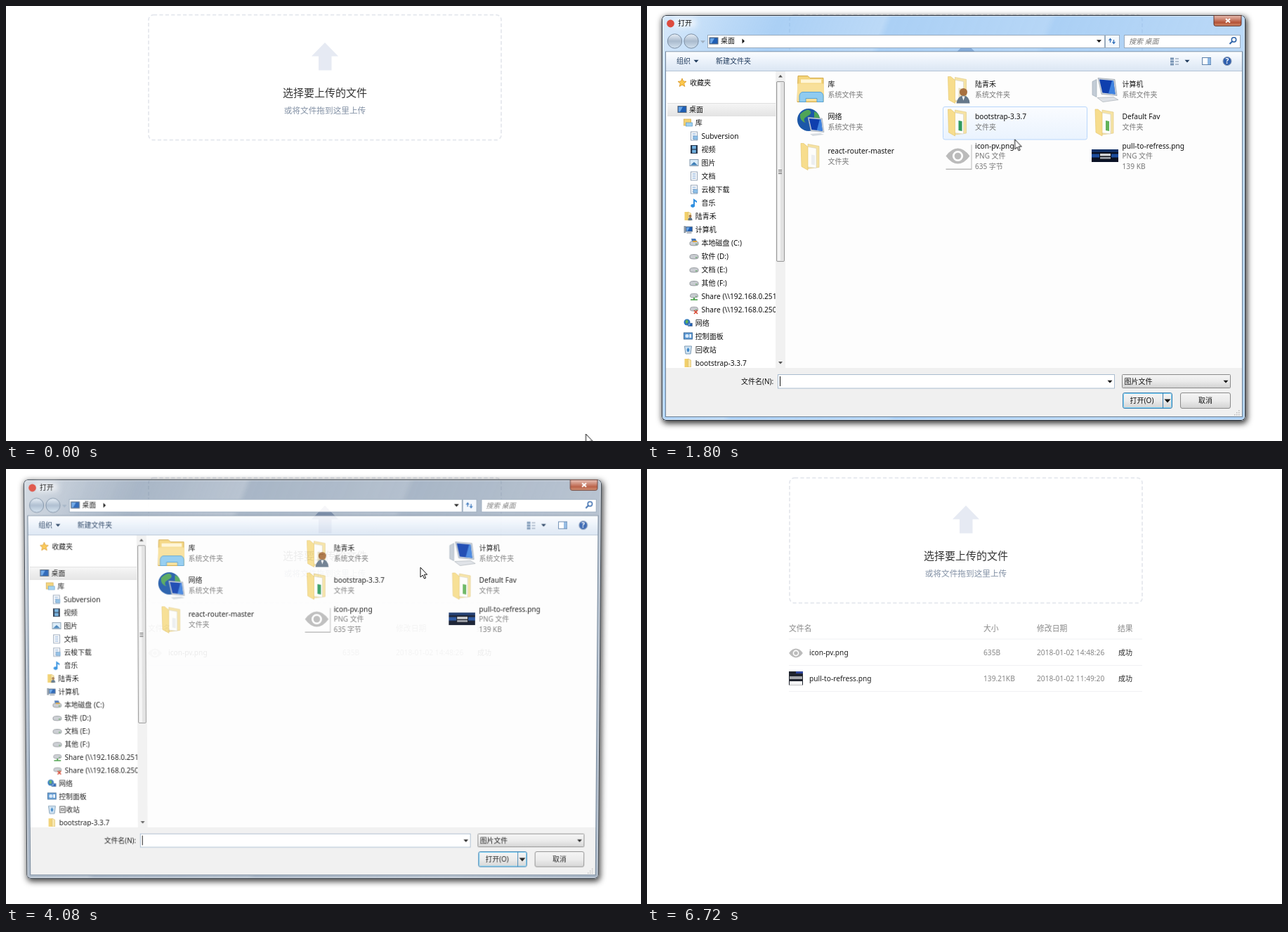
An HTML page for the animation above (7.27 s loop, 904 by 619 pixels).

```html
<!DOCTYPE html>
<html lang="zh-CN">
<head>
<meta charset="utf-8">
<title>文件上传</title>
<style>
html, body { margin: 0; width: 100%; height: 100%; overflow: hidden; background: #fff; }
svg { position: absolute; left: 0; top: 0; overflow: visible; }
text { font: 10px "Noto Sans", "Noto Sans CJK SC", "Noto Sans CJK", sans-serif; white-space: pre; }
text.latin { font-size: 10.2px; }
#page, #dialog, #dialog *, #page *, #cursor, #cursor * {
  animation-duration: 7270ms; animation-iteration-count: infinite;
  animation-timing-function: step-end; animation-play-state: paused;
}

/* page */
#up { animation-name: up; }
#table { animation-name: table; }
#busy1 { animation-name: busy1; }
#done1 { animation-name: done1; }
#row2 { animation-name: row2; }
#busy2 { animation-name: busy2; }
#done2 { animation-name: done2; }
@keyframes up {
  0%, 34%, 73%, 100% { fill: #e6eaf3; }
  6%, 40.3% { fill: #8792ad; }
}
@keyframes table { 0% { opacity: 0; } 34.4%, 100% { opacity: 1; } }
@keyframes busy1 { 0% { opacity: 1; } 49.2%, 100% { opacity: 0; } }
@keyframes done1 { 0% { opacity: 0; } 49.2%, 100% { opacity: 1; } }
@keyframes row2 { 0% { opacity: 0; } 73.3%, 100% { opacity: 1; } }
@keyframes busy2 { 0% { opacity: 1; } 92.4%, 100% { opacity: 0; } }
@keyframes done2 { 0% { opacity: 0; } 92.4%, 100% { opacity: 1; } }

/* dialog */
#dialog {
  position: absolute; left: 21px; top: 13px; width: 831px; height: 577px; border-radius: 6px;
  background-image: linear-gradient(112deg, #fff8 0, #fff3 9%, #fff0 16%, #fff3 30%, #fff0 31%, #fff2 52%, #fff0 53%, #fff3 80%, #fff0 100%);
  box-shadow: 1.5px 3px 9px 1px #000c, inset 0 0 0 1px #2a3542, inset 0 0 0 2px #ffffff8c;
  animation-name: pose, glass; animation-timing-function: linear, linear;
}
#dialog svg { left: -21px; top: -13px; }
@keyframes pose {
  0%, 19.4%, 35.62%, 54.6%, 74.41%, 100% { opacity: 0; transform: translateY(-4px) perspective(1400px) rotateX(-4deg) scale(.92); }
  19.53%, 54.74% { opacity: .72; transform: translateY(-4px) perspective(1400px) rotateX(-4deg) scale(.955); }
  20.49%, 55.83% { opacity: .92; transform: translateY(-1px) perspective(1400px) rotateX(-1.5deg) scale(.985); }
  21.59%, 29.02%, 56.91%, 69.02% { opacity: 1; transform: translateY(0) perspective(1400px) rotateX(0deg) scale(1); }
  30.12%, 70.1% { opacity: 1; transform: translateY(0) perspective(1400px) rotateX(0deg) scale(.994); }
  32.32%, 71.18% { opacity: .98; transform: translateY(-.5px) perspective(1400px) rotateX(0deg) scale(.99); }
  33.42%, 72.25% { opacity: .65; transform: translateY(-1px) perspective(1400px) rotateX(-1deg) scale(.97); }
  34.52%, 73.34% { opacity: .28; transform: translateY(-2px) perspective(1400px) rotateX(-2deg) scale(.945); }
}
@keyframes glass {
  0%, 20.5%, 30.1%, 55.8%, 70.1%, 100% { background-color: #61789699; }
  21.5%, 29.1%, 56.9%, 69.1% { background-color: #73b1ee99; }
}
#hover { animation-name: hover; }
#sel { animation-name: sel; }
#appIcon { animation-name: appIcon; }
#caption { animation-name: caption; }
#name1 { animation-name: name1; }
#name2 { animation-name: name2; }
#caret { animation-name: caret; }
@keyframes hover {
  0% { opacity: 1; transform: translate(421px, 143px); }
  23.8% { opacity: 1; transform: translate(421px, 190px); }
  27.8% { opacity: 0; transform: translate(630px, 190px); }
  62.9% { opacity: 1; transform: translate(630px, 190px); }
  67.8%, 100% { opacity: 0; transform: translate(630px, 190px); }
}
@keyframes sel {
  0% { opacity: 0; transform: translate(421px, 190px); }
  27.8% { opacity: 1; transform: translate(421px, 190px); }
  36% { opacity: 0; transform: translate(630px, 190px); }
  67.8%, 100% { opacity: 1; transform: translate(630px, 190px); }
}
@keyframes appIcon { 0%, 50% { opacity: 1; } 30%, 70%, 100% { opacity: 0; } }
@keyframes caption { 0%, 50% { transform: none; } 30%, 70%, 100% { transform: translateX(-17px); } }
@keyframes name1 { 0%, 40%, 100% { opacity: 0; } 27.8% { opacity: 1; } }
@keyframes name2 { 0% { opacity: 0; } 67.8%, 100% { opacity: 1; } }
@keyframes caret { 0%, 50% { opacity: 1; } 27.8%, 60%, 100% { opacity: 0; } }

/* pointer */
#cursor g { animation-name: move; animation-timing-function: linear; }
#arrow { animation-name: arrow; }
#hand { animation-name: hand; }
@keyframes move {
  0% { transform: translate(825.5px, 609px); animation-timing-function: ease-out; }
  7.42%, 9.16% { transform: translate(600px, 135px); }
  18.4%, 19.53% { transform: translate(585.5px, 163px); }
  25.85%, 39.48% { transform: translate(492px, 203.5px); }
  46.07%, 48.1% { transform: translate(565.5px, 112px); }
  52.68%, 58% { transform: translate(590px, 140px); }
  64.51%, 83.82% { transform: translate(680.5px, 208px); animation-timing-function: linear; }
  90.09%, 100% { transform: translate(886px, 630px); }
}
@keyframes hand { 0%, 19.4%, 54.6%, 100% { opacity: 0; } 6%, 40.3% { opacity: 1; } }
@keyframes arrow { 0%, 19.4%, 54.6%, 100% { opacity: 1; } 6%, 40.3% { opacity: 0; } }
</style>
</head>
<body>
<svg id="page" width="904" height="619"></svg>
<div id="dialog"><svg id="win" width="904" height="619"></svg></div>
<svg id="cursor" width="904" height="619">
  <g>
    <path id="arrow" d="M0 0V14L3.3 11 5.5 16 7.6 15.1 5.4 10.2H9.6Z" fill="#fff" stroke="#111"/>
    <path id="hand" d="M-1.4 1.2Q0-.8 1.4 1.2V6.4Q3-.0 3.6 6.8 5.4 5 6 7.4 8 6.2 8 8.6V13L6.4 16V18H-2V16L-5.4 11Q-6.4 8.4-4 9L-1.4 11Z" fill="#fff" stroke="#222"/>
  </g>
</svg>
<script>
const LOOP = 7270;

const rect = (x, y, w, h, fill, more = '') =>
  `<rect x="${x}" y="${y}" width="${w}" height="${h}" fill="${fill}" ${more}/>`;
const path = (d, fill, more = '') => `<path d="${d}" fill="${fill}" ${more}/>`;
const circle = (x, y, r, fill, more = '') => `<circle cx="${x}" cy="${y}" r="${r}" fill="${fill}" ${more}/>`;
const line = (d, color, w = 1) => path(d, 'none', `stroke="${color}" stroke-width="${w}"`);
// y is the visual middle of the line
const text = (x, y, s, fill = '#111', more = '') =>
  `<text x="${x}" y="${y + 3.7}" fill="${fill}" ${/[^\x00-\x7f]/.test(s) ? '' : 'class="latin"'} ${more}>${s}</text>`;
const at = (x, y, body, scale = 1) => `<g transform="translate(${x} ${y}) scale(${scale})">${body}</g>`;
const down = (x, y, fill = '#111') => path(`M${x - 3.5} ${y - 1.7}h7l-3.5 3.8z`, fill);
const grad = (id, ...stops) => `<linearGradient id="${id}" x2="0" y2="1">` +
  stops.map((c, i) => `<stop offset="${i / (stops.length - 1)}" stop-color="${c}"/>`).join('') + '</linearGradient>';
const $ = id => document.getElementById(id);

const eye = path('M-17 0Q-9-11 0-11T17 0Q9 11 0 11T-17 0ZM-7.6 0A7.6 7.6 0 0 0 7.6 0 7.6 7.6 0 0 0-7.6 0Z', '#bbb', 'fill-rule="evenodd"') +
  circle(0, 0, 4.8, '#bbb');

/* page */
const head = (x, s) => text(x, 227, s, '#888', 'style="font-size:10.83px"');
const row = (y, n, name, size, date) =>
  line(`M202 ${y + 18.5}H705`, '#f0f1f4') +
  `<g id="busy${n}">${rect(202, y - 18.5, 504, 37, '#e9effd')}` +
  text(671, y, '取消', '#2460c8', 'text-decoration="underline"') + '</g>' +
  `<g id="done${n}">${text(671, y, '成功', '#222')}</g>` +
  text(231, y, name, '#222') + text(479, y, size, '#858585') + text(555, y, date, '#858585');

$('page').innerHTML =
  rect(203, 12.7, 502, 178, 'none', 'rx="7" stroke="#e4e7ed" stroke-width="1.7" stroke-dasharray="5.2 3.2"') +
  path('M454 52 473 71.5H463.5V91.5H445V71.5H435Z', '#e6eaf3', 'id="up"') +
  text(454, 125.6, '选择要上传的文件', '#333', 'text-anchor="middle" style="font-size:15px"') +
  text(454, 148.8, '或将文件拖到这里上传', '#8492a6', 'text-anchor="middle" style="font-size:11.67px"') +
  '<g id="table">' + head(202, '文件名') + head(479, '大小') + head(555, '修改日期') + head(670, '结果') +
  line('M202 242H705', '#f0f1f4') +
  row(261, 1, 'icon-pv.png', '635B', '2018-01-02 14:48:26') + at(212, 262, eye, .58) +
  '<g id="row2">' + row(298, 2, 'pull-to-refress.png', '139.21KB', '2018-01-02 11:49:20') +
  rect(202, 288, 20, 19.5, '#20242e') + rect(212, 288, 10, 3, '#2f469c') + rect(203, 295, 18, 4, '#a7a9ad') +
  rect(203, 302, 18, 5.5, '#f4f4f4') + '</g></g>';

/* small icons, about 12px, centred on 0,0 */
const page = rect(-4.5, -6, 9, 12, '#fff', 'stroke="#8a9bb0" stroke-width=".9"') + line('M-2.5-3h5M-2.5 0h5M-2.5 3h5', '#6d9bd0');
const screen = rect(-6, -4.5, 12, 9, '#1f5fb5', 'stroke="#5d6b7a"') + path('M-5-3.5h6l-4 7h-2z', '#69a5e6');
const disk = path('M-6 0Q-6-2.5 0-2.5T6 0V2.5Q5 4 0 4T-6 2.5Z', '#c9ccd1', 'stroke="#85898f" stroke-width=".8"') + rect(2, 1.4, 2.5, 1, '#4a9a4a');
const book = rect(-5, -6, 5, 12, '#f1cf6a') + path('M0-6 4-4V6H0Z', '#f8e5a6', 'stroke="#d6b04e" stroke-width=".6"');
const globe = circle(-1.5, -1, 4.5, '#2b74c0') + path('M-4-3q3-3 4 0t-3 4z', '#5fb05a');
const icon = {
  star: path('M0-6 1.7-2 6-1.6 2.7 1.2 3.8 5.5 0 3.2-3.8 5.5-2.7 1.2-6-1.6-1.7-2Z', '#fbc74c', 'stroke="#d99420" stroke-width=".8"'),
  screen, page, disk, book,
  lib: rect(-6, -5, 10, 9, '#f3d273', 'stroke="#cfa544" stroke-width=".7"') + rect(-3, 0, 9, 5, '#9fd0f0', 'stroke="#5c9ac6" stroke-width=".7"'),
  film: rect(-5, -6, 10, 12, '#26354a') + rect(-2.8, -5, 5.6, 4.4, '#6fb0e0') + rect(-2.8, .6, 5.6, 4.4, '#6fb0e0'),
  pic: rect(-6, -4.5, 12, 9, '#d9ebf8', 'stroke="#8499ad"') + path('M-5 3.5 0-1 5 3.5z', '#3c7db5'),
  note: path('M-1-6 4-2.5V0L1-2V3.5A3 2.4 0 1 1-1 2Z', '#2f8fe0'),
  down: page + rect(-1, 0, 6, 5, '#8fc0e8', 'stroke="#5a89b5" stroke-width=".6"'),
  user: book + circle(3, 0, 2, '#a4774a') + path('M0 6q0-4 3-4t3 4z', '#5c7387'),
  pc: at(1.5, -.5, screen, .75) + rect(-6, -5, 2.6, 10, '#8c99a8') + rect(-2, 4, 7, 1.6, '#a3aab3'),
  os: disk + path('M-4-6h6l2 4h-7z', '#4a78b8') + rect(-2, -3, 6, 2, '#d9a23c'),
  share: at(0, -1.5, disk, .9) + rect(-1, 2, 2, 3, '#4aa04a') + line('M-5 5H5', '#4aa04a', 1.6),
  broken: at(0, -1.5, disk, .9) + line('M0 1 5 6M5 1 0 6', '#d8452e', 1.6),
  net: globe + at(3, 2.5, screen, .5),
  panel: rect(-6, -5, 12, 9, '#5e9bd6', 'stroke="#3d6c9c"') + circle(-1.5, -.5, 2.5, '#d8eafa') + rect(2, -3, 2.5, 5, '#fff'),
  bin: path('M-5-5H5L3.5 6H-3.5Z', '#cfe3f3', 'stroke="#7f9cb5"') + path('M-2 0 0-3 2 0 1 3h-2z', '#3f88c9')
};

/* large icons, about 38px */
const folder = accent => path('M-4-17 12-14V16L-4 18Z', '#f6e3a4', 'stroke="#e0c67c" stroke-width=".6"') +
  path('M-9-14 8-11V17L-9 15Z', '#fdfdfb', 'stroke="#d2d0c6" stroke-width=".6"') + path('M1-2 6-1V13L1 12Z', accent) +
  path('M-14-18-10-18-4-13V20L-13 15Z', '#f7dd8d', 'stroke="#e3c367" stroke-width=".6"');
const bigScreen = path('M-13-15 11-13 14 10-8 8Z', '#c9d1da', 'stroke="#8793a0" stroke-width=".6"') +
  path('M-11-13 9-11.3 11.6 8-6.6 6Z', '#0f3fae') + path('M2 7 7-11.5 9-11.3 11.6 8Z', '#3f83e0');
const big = {
  lib: path('M-18-19H-4l3 3H18V18H-19Z', '#f4d57c', 'stroke="#d2a846"') + rect(-14, -14, 29, 5, '#fff6d8') +
    rect(-19, -8, 38, 25, '#f8e09a') + path('M-16 18V9Q-15 4-11 4H13Q17 4 18 9V18H9V13H-7V18Z', '#8fcbf0', 'stroke="#5ba3d2"'),
  user: folder('#e8dfc0') + circle(8, 4, 5.5, '#a8703f') + path('M-2 20Q0 9 8 9T17 20Z', '#66788a') + path('M6 10h4l-2 6z', '#fff'),
  pc: path('M-18-11-12-14V11L-18 8Z', '#c3ccd6', 'stroke="#98a4b1" stroke-width=".6"') + at(3, -1, bigScreen) +
    path('M-11 12 12 11 19 15-3 18Z', '#dde1e6', 'stroke="#a0a6ad" stroke-width=".6"'),
  net: circle(-3, -3, 16, '#1c57a8') + path('M-15-11q10-9 14-5t-4 8-2 9q-9-2-8-12zM5-15q9 3 8 14l-8-4z', '#4fa557') +
    at(7, 6, bigScreen, .85) + path('M-1 17 14 16 19 18 3 20Z', '#d6dbe0'),
  plain: folder('#eceef0'),
  boot: folder('#2f9a5d'),
  fav: folder('#62b35a'),
  eye: path('M-17 18H19V-16H20V19.5H-17Z', '#b9b9b9') + eye,
  shot: rect(-19, -9.5, 38, 18, '#0a1226') + rect(-19, -9.5, 38, 4, '#123066') + rect(-19, -3, 38, 5, '#1d4c9c') +
    rect(-8, -5, 17, 10, '#0c0f18') + rect(-7, -3.5, 15, 3.5, '#cfd1d5') + rect(-7, 1.5, 15, 2.5, '#a9adb5')
};

/* dialog */
const tree = [
  [0, 'screen', '桌面'], [1, 'lib', '库'], [2, 'down', 'Subversion'], [2, 'film', '视频'], [2, 'pic', '图片'],
  [2, 'page', '文档'], [2, 'down', '云梭下载'], [2, 'note', '音乐'], [1, 'user', '陆青禾'], [1, 'pc', '计算机'],
  [2, 'os', '本地磁盘 (C:)'], [2, 'disk', '软件 (D:)'], [2, 'disk', '文档 (E:)'], [2, 'disk', '其他 (F:)'],
  [2, 'share', 'Share (\\\\192.168.0.251)'], [2, 'broken', 'Share (\\\\192.168.0.250)'],
  [1, 'net', '网络'], [1, 'panel', '控制面板'], [1, 'bin', '回收站'], [1, 'book', 'bootstrap-3.3.7']
].map(([level, kind, name], i) =>
  at(50 + level * 8.5, 147 + i * 19, icon[kind]) + text(60 + level * 8.7, 147 + i * 19, name)).join('');

const files = [
  ['lib', '库', '系统文件夹'], ['user', '陆青禾', '系统文件夹'], ['pc', '计算机', '系统文件夹'],
  ['net', '网络', '系统文件夹'], ['boot', 'bootstrap-3.3.7', '文件夹'], ['fav', 'Default Fav', '文件夹'],
  ['plain', 'react-router-master', '文件夹'], ['eye', 'icon-pv.png', 'PNG 文件', '635 字节'],
  ['shot', 'pull-to-refress.png', 'PNG 文件', '139 KB']
].map(([kind, ...lines], i) => {
  const x = 233 + i % 3 * 209.5, y = [118.5, 165, 213.5][i / 3 | 0];
  return at(x, y, big[kind]) + lines.map((s, k) =>
    text(x + 24.5, y + (k - (lines.length - 1) / 2) * (lines.length > 2 ? 14.5 : 15.3), s, k ? '#777' : '#111')).join('');
}).join('');

const box = (x, y, w, h, fill = '#fff', stroke = '#9aabbd', more = '') => rect(x, y, w, h, fill, `stroke="${stroke}" ${more}`);
const tile = (id, fill, stroke) => `<g id="${id}">${box(.5, .5, 205, 46.5, fill, stroke, 'rx="2.5"')}</g>`;

$('win').innerHTML = '<defs>' +
  grad('tool', '#fbfdff', '#eaf1fa', '#dbe6f3') + grad('btn', '#f4f4f4', '#ebebeb', '#d2d2d2') +
  grad('close', '#e6bcb0', '#cf8a77', '#b55438', '#d08c6c') + grad('selFill', '#dcebfd', '#bfdafc') +
  grad('hovFill', '#fafcff', '#eaf3fe') + grad('orb', '#e8eff7', '#a9bacd', '#d3e2f0') + grad('rowFill', '#f6f6f6', '#e4e4e4') +
  '<clipPath id="side"><rect x="27" y="93" width="156" height="421"/></clipPath>' +
  '<filter id="glow" x="-1" y="-1" width="3" height="3"><feGaussianBlur stdDeviation="4"/></filter></defs>' +
  // title and address row
  '<g id="caption">' + rect(38, 18, 32, 12, '#fff', 'opacity=".7" filter="url(#glow)"') + text(44, 24, '打开') + '</g>' +
  circle(33.5, 25, 5.4, '#dd4b3e', 'id="appIcon"') +
  path('M807 13.5H846V26Q846 28.5 843 28.5H810Q807 28.5 807 26Z', 'url(#close)', 'stroke="#5b2c22" stroke-width=".9"') +
  line('M824 18.2 830 23.6M830 18.2 824 23.6', '#fff', 2) +
  circle(39.5, 50, 10.2, 'url(#orb)', 'stroke="#7b8ea3"') + circle(63, 50, 10.2, 'url(#orb)', 'stroke="#7b8ea3"') +
  down(79.5, 51, '#9fb0c2') +
  box(86.5, 41.5, 565, 18) + box(652.5, 41.5, 20, 18, '#f3f8fd') + box(679.5, 41.5, 165, 18) +
  at(95, 49.5, screen) + text(105, 49.3, '桌面') + path('M135.5 46.5v7l3.5-3.5z', '#111') + down(643.5, 50) +
  line('M659.5 52v-5m-2 2 2-2.5 2 2.5M664.5 48v5m-2-2 2 2.5 2-2.5', '#2b6cb8', 1.2) +
  text(686, 50, '搜索 桌面', '#777', 'style="font-style:italic"') +
  circle(835.5, 48, 3.2, 'none', 'stroke="#2c62a8" stroke-width="1.5"') + line('M833 50.5 829.5 54', '#2c62a8', 2) +
  // client area
  rect(26.5, 65, 821, 519.5, '#fff', 'stroke="#6d8094"') + rect(27, 65.5, 820, 27, 'url(#tool)') + line('M27 92.5H847', '#b4c4d6') +
  text(42, 78.5, '组织', '#1e395b') + down(70, 78.5, '#1e395b') + text(98, 78.5, '新建文件夹', '#1e395b') +
  [0, 1, 2].map(i => rect(745, 73.5 + i * 4, 5, 3, '#7894b4') + line(`M752 ${75 + i * 4}h5`, '#7c8fa5')).join('') +
  down(769, 78.5, '#1e395b') + box(790.5, 73.5, 12, 10, '#fff', '#5f82ab') + rect(798, 74, 4.5, 9, '#8db6e2') +
  circle(826, 78.5, 6, '#2f5fae', 'stroke="#8b9cb5"') + text(826, 78.3, '?', '#fff', 'text-anchor="middle" style="font-weight:700"') +
  // tree
  rect(29, 138, 154, 18.5, 'url(#rowFill)') + line('M29 138.5H183M29 156.5H183', '#e0e0e0') +
  '<g clip-path="url(#side)">' + at(50, 109, icon.star) + text(61, 109, '收藏夹') + tree + '</g>' +
  rect(183, 93, 14, 422, '#f1f1f1') + box(184.5, 107.5, 11, 256, '#e2e2e2', '#9b9b9b', 'rx="1.5"') + rect(186, 109, 4, 253, '#f5f5f5') +
  line('M187 233.5h5M187 236h5M187 238.5h5', '#666') + path('M187 101.5h6l-3-3.5z', '#555') + path('M187 506h6l-3 3.5z', '#555') +
  // files
  rect(197, 93, 650, 422, '#fdfdfd') + tile('hover', 'url(#hovFill)', '#b8d6fb') + tile('sel', 'url(#selFill)', '#7da2ce') + files +
  // bottom panel
  rect(27, 515, 820, 69, '#f0f0f0') + text(134, 534, '文件名(N):') + box(186.5, 524.5, 479, 19.5, '#fff', '#a9bccf') + down(659, 534.5) +
  text(189, 534, 'icon-pv.png', '#111', 'id="name1"') + text(189, 534, 'pull-to-refress.png', '#111', 'id="name2"') +
  rect(189, 527, 1, 14, '#111', 'id="caret"') +
  box(676.5, 524.5, 154, 19, 'url(#btn)', '#8a8a8a', 'rx="1"') + text(679.5, 534, '图片文件') + down(824, 534.5) +
  box(677.5, 550.5, 70, 22, 'url(#btn)', '#3c7fb1', 'rx="2.5"') + box(678.5, 551.5, 68, 20, 'none', '#7fd3f5', 'rx="2"') +
  line('M734.5 551V572', '#3c7fb1') + text(704.5, 561, '打开(O)', '#111', 'text-anchor="middle"') +
  path('M736.5 559.5h9l-4.5 5z', '#111') +
  box(759.5, 550.5, 71, 22, 'url(#btn)', '#8a8a8a', 'rx="2.5"') + text(795, 561, '取消', '#111', 'text-anchor="middle"') +
  [[842, 575], [839, 578], [842, 578], [836, 581], [839, 581], [842, 581]].map(([x, y]) => rect(x, y, 1.5, 1.5, '#bbb')).join('');

/* the picture only changes at these beats: first, last, count */
const beats = [0];
[[70, 540, 7], [750, 1420, 9], [1490, 1880, 6], [2030, 2190, 3], [2350, 2590, 4], [2950, 3350, 6], [3580, 3830, 4],
 [3980, 4690, 10], [4940, 5410, 7], [6170, 6550, 6], [6720, 6720, 1]].forEach(([a, b, n]) => {
  for (let i = 0; i < n; i++) beats.push(a + (n > 1 ? i * (b - a) / (n - 1) : 0));
});

const anims = document.getAnimations();
const start = performance.now();
function tick() {
  const t = (performance.now() - start) % LOOP;
  const beat = beats.findLast(b => b <= t) || 0;
  anims.forEach(a => { a.currentTime = beat; });
  requestAnimationFrame(tick);
}
tick();
</script>
</body>
</html>
```
